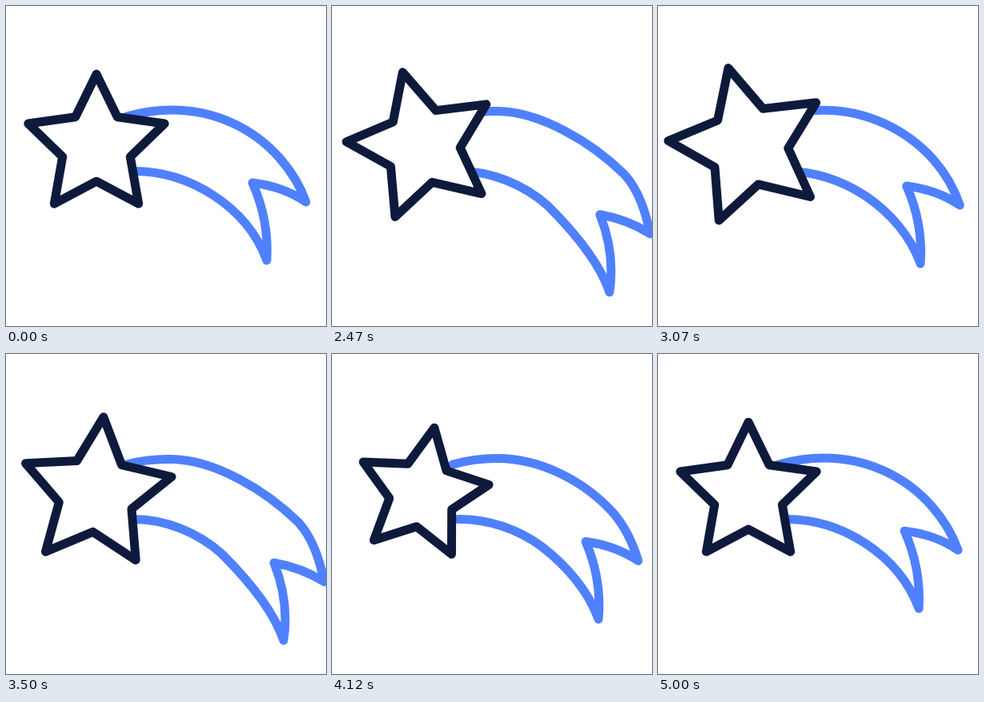
Write an HTML page that moves like this. It is 400 px wide and 400 px high and loops after 5.02 s.

```html
<!DOCTYPE html>
<html lang="en">
<head>
<meta charset="utf-8">
<title>Shooting star</title>
<style>
  html, body { margin: 0; width: 100%; height: 100%; overflow: hidden; background: #fff; }
  svg { display: block; width: 100%; height: 100%; }
  path { stroke-width: 11; stroke-linejoin: round; stroke-linecap: round; }
</style>
</head>
<body>
<svg viewBox="0 0 400 400">
  <path id="tail" fill="none" stroke="#4f80ff"/>
  <path id="star" fill="#fff" stroke="#0e1a3c"/>
</svg>
<script>
const LOOP = 5020, HOLD = 2020, BEAT = 1000;
const CENTER = { x: 113, y: 174.7 }, OUTER = 89.6, INNER = 44.5;

// Start point, then cubic segments: top edge, forked end, bottom edge.
const SHORT_TAIL = [
  151, 138, 169, 133, 188, 130, 207, 130,
  261, 130, 309, 152.5, 342, 190, 356, 206, 367.5, 224, 375, 245,
  356, 232, 333, 224, 308, 221, 321, 250, 328, 284, 326, 318,
  313.5, 284, 289, 256, 259, 236.5, 229, 217, 193.5, 206, 158, 206.5
];
const LONG_TAIL = [
  151, 138, 169, 133, 188, 131, 207, 131.5,
  260, 132, 325, 170, 366, 211, 384, 231, 392, 258, 398, 285,
  379, 273, 358, 265, 335, 261, 347, 291, 352, 325, 347, 358,
  335, 322, 303, 283, 270, 250, 240, 223, 198, 206, 158, 206.5
];

const mix = (a, b, k) => a + (b - a) * k;
const clamp = x => Math.min(1, Math.max(0, x));
const sine = x => (1 - Math.cos(Math.PI * x)) / 2;
const soft = x => x + x * (1 - x) / 4;

// Cubic bezier easing (.2, 0, .2, 1), solved by bisection.
function snap(x) {
  let low = 0, high = 1;
  for (let i = 0; i < 24; i++) {
    const s = (low + high) / 2;
    if (0.6 * s * (1 - s) + s ** 3 < x) low = s; else high = s;
  }
  return low * low * (3 - 2 * low);
}

function tailStretch(t) {
  const x = (t % BEAT) / (BEAT / 2);
  return x < 1 ? snap(x) : 1 - sine(x - 1);
}

function starPose(t) {
  const x = (t % BEAT) / BEAT;
  if (t < BEAT) return { angle: -15.1 * snap(clamp(x * 2)), scale: mix(1, 1.12, soft(x)) };
  if (t < 2 * BEAT) return { angle: mix(-15.1, 10.5, snap(x)), scale: mix(1.12, 0.927, x * x) };
  return { angle: mix(10.5, 0, sine(x)), scale: mix(0.927, 1, soft(x)) };
}

function tailPath(k) {
  const p = SHORT_TAIL.map((v, i) => mix(v, LONG_TAIL[i], k).toFixed(2));
  return `M${p.slice(0, 2)}C${p.slice(2)}`;
}

function starPath({ angle, scale }) {
  const points = Array.from({ length: 10 }, (_, i) => {
    const a = (angle + i * 36) * Math.PI / 180;
    const r = scale * (i % 2 ? INNER : OUTER);
    return [CENTER.x + r * Math.sin(a), CENTER.y - r * Math.cos(a)].map(v => v.toFixed(2));
  });
  return `M${points.join("L")}Z`;
}

const tail = document.getElementById("tail");
const star = document.getElementById("star");

function draw(time) {
  const t = Math.max(0, time % LOOP - HOLD);
  tail.setAttribute("d", tailPath(tailStretch(t)));
  star.setAttribute("d", starPath(starPose(t)));
}

const start = performance.now();
function tick() {
  draw(performance.now() - start);
  requestAnimationFrame(tick);
}
tick();
</script>
</body>
</html>
```
